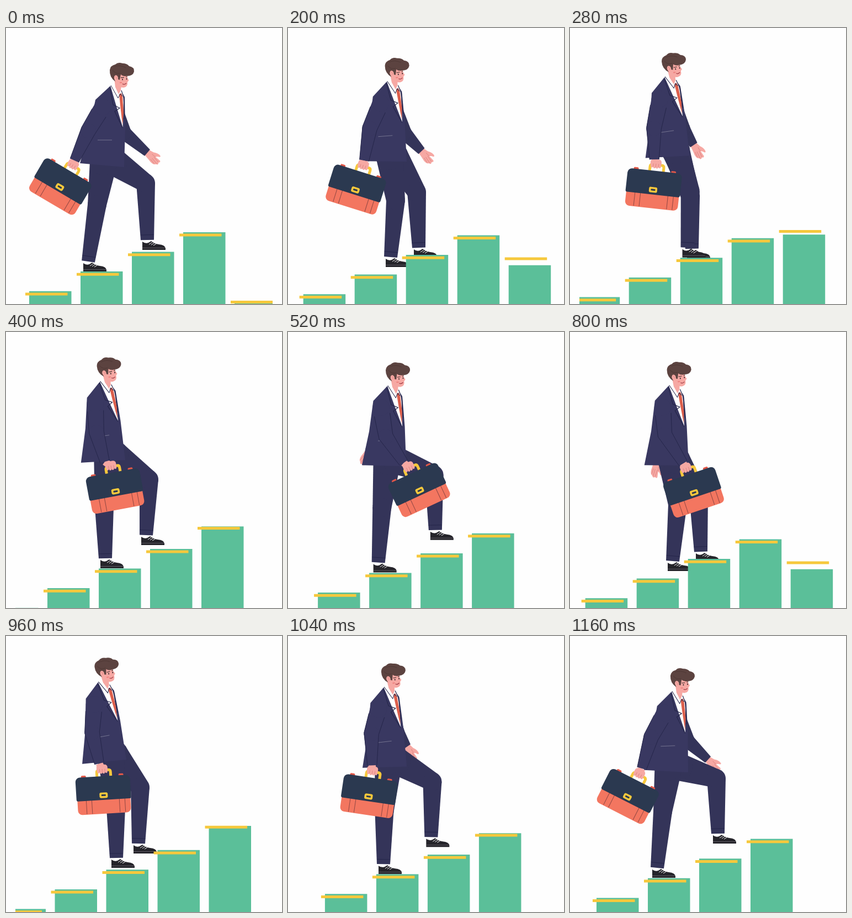
Write an HTML page with a canvas that moves like this. It is 500 px wide and 500 px high and loops after 1200 ms.

```html
<!DOCTYPE html>
<html lang="en">
<head>
<meta charset="utf-8">
<title>Climbing the chart</title>
<style>
  html, body { margin: 0; width: 100%; height: 100%; overflow: hidden; background: #fefefe; }
  canvas { display: block; }
</style>
</head>
<body>
<canvas id="stage" width="500" height="500"></canvas>
<script>
const ctx = document.getElementById('stage').getContext('2d');
const LOOP = 1200, STEP = 600, TICK = 40;
const NAVY = '#393861', TROUSER = '#343459', LINE = '#25264a';
const SKIN = '#f6a8a3', SKIN_LINE = '#d9807e', HAIR = '#5c4340';
const YELLOW = '#f6c83c', GREEN = '#5bbf99', FLAP = '#2b3950', ORANGE = '#f37660';

// Key poses: time in ms, then the values
const SCROLL = [[0, 0], [80, .5], [200, 14.3], [360, 46.5], [400, 60], [560, 87], [600, 93]];
// Rise of a new column: column offset, extra bar offset
const RISE = [[-200, 200, 0], [-40, 175, -4], [0, 164, -7], [80, 160, -8], [200, 90, -17],
  [360, -8, -3], [400, -5, -2], [560, 0, 0]];
// Jacket corner x, y and lean in degrees
const TORSO = [[0, 214, 252, 0], [80, 213, 251.5, 0], [200, 215, 242, -4.4],
  [360, 218, 224, -10.5], [400, 216, 232, -8.4], [560, 214, 247, -2]];
// Knee x, y, heel x, sole y
const LEG = [[0, 253, 281, 247, 402], [80, 255, 282, 248, 402], [200, 233, 297, 228, 416],
  [360, 199, 312, 191, 420], [400, 178, 318, 171, 428], [560, 168, 318, 149, 438],
  [600, 165, 320, 140, 441], [680, 163, 318, 140, 441], [800, 195, 312, 177, 433],
  [960, 243, 274, 231, 394], [1000, 259, 267, 245, 386], [1160, 265, 258, 259, 376]];
// Elbow x, y, wrist x, y, grip x, y, case angle
const NEAR_ARM = [[0, 149, 186, 124, 240, 121, 248, 30.5], [80, 149, 186, 124, 240, 121, 248, 30.5],
  [200, 148, 182, 138, 240, 136, 249, 17.5], [400, 164, 182, 179, 235, 190, 243, -10.5],
  [600, 183, 193, 221, 238, 229, 246, -29.5], [680, 184, 193, 222, 238, 230, 246, -29.5],
  [800, 172, 186, 205, 238, 210, 247, -18.6], [960, 156, 175, 169, 231, 174, 242, -3.5],
  [1160, 147, 183, 130, 240, 125, 250, 27]];
// Elbow x, y, wrist x, y
const FAR_ARM = [[0, 214, 190, 256, 226], [80, 214, 190, 256, 226], [200, 211, 190, 242, 223],
  [400, 190, 170, 190, 195], [600, 158, 178, 132, 226], [680, 158, 178, 132, 226],
  [800, 165, 185, 158, 236], [960, 185, 165, 192, 190], [1160, 213, 190, 250, 224]];

const clamp = (v, lo, hi) => Math.min(hi, Math.max(lo, v));
const mod = (v, n) => ((v % n) + n) % n;

// Monotone cubic through the keys; wraps when a period is given, else holds the ends
function at(keys, time, period) {
  const n = keys.length;
  const key = i => {
    if (!period) return keys[clamp(i, 0, n - 1)];
    const turn = Math.floor(i / n), [t, ...rest] = keys[i - turn * n];
    return [t + turn * period, ...rest];
  };
  const t = period ? mod(time, period) : clamp(time, keys[0][0], keys[n - 1][0]);
  let i = 0;
  while (i < (period ? n - 1 : n - 2) && key(i + 1)[0] <= t) i++;
  const [k0, k1, k2, k3] = [key(i - 1), key(i), key(i + 1), key(i + 2)];
  const h = k2[0] - k1[0], u = (t - k1[0]) / h;
  const rate = (a, b, c) => b[0] === a[0] ? 0 : (b[c] - a[c]) / (b[0] - a[0]);
  const tangent = (p, q) => p * q <= 0 ? 0 : 2 * p * q / (p + q);
  return k1.slice(1).map((v, j) => {
    const c = j + 1, mid = rate(k1, k2, c);
    const m1 = tangent(rate(k0, k1, c), mid) * h, m2 = tangent(mid, rate(k2, k3, c)) * h;
    const d = k2[c] - v;
    return v + u * (m1 + u * (3 * d - 2 * m1 - m2 + u * (m1 + m2 - 2 * d)));
  });
}

function shape(path, fill, stroke, width = 1) {
  const p = new Path2D(path);
  if (fill) { ctx.fillStyle = fill; ctx.fill(p); }
  if (stroke) { ctx.strokeStyle = stroke; ctx.lineWidth = width; ctx.stroke(p); }
}

function box(x, y, w, h, fill, r = 0) {
  ctx.beginPath();
  ctx.roundRect(x, y, w, h, r);
  ctx.fillStyle = fill;
  ctx.fill();
}

function placed(x, y, angle, draw) {
  ctx.save();
  ctx.translate(x, y);
  ctx.rotate(angle);
  draw();
  ctx.restore();
}

const normal = (a, b) => {
  const dx = b[0] - a[0], dy = b[1] - a[1], len = Math.hypot(dx, dy) || 1;
  return [-dy / len, dx / len];
};
const shift = (p, n, r) => [p[0] + n[0] * r, p[1] + n[1] * r];
const mix = (a, b, u) => [a[0] + (b[0] - a[0]) * u, a[1] + (b[1] - a[1]) * u];

function poly(points, fill, stroke) {
  const d = 'M' + points.map(p => p.join(' ')).join('L');
  shape(fill ? d + 'Z' : d, fill, stroke);
}

// Two tapered segments with round upper joints and a flat end
function limb(joints, radii, fill) {
  for (let i = 0; i < 2; i++) {
    const [a, b] = [joints[i], joints[i + 1]], n = normal(a, b);
    poly([shift(a, n, radii[i]), shift(b, n, radii[i + 1]),
      shift(b, n, -radii[i + 1]), shift(a, n, -radii[i])], fill);
    ctx.beginPath();
    ctx.arc(...a, radii[i], 0, 7);
    ctx.fill();
  }
}

function seams([a, b, c], [ra, rb, rc]) {
  const n1 = normal(a, b), n2 = normal(b, c), n = mix(n1, n2, .5);
  for (const side of [1, -1]) {
    const start = mix(shift(a, n1, ra * side), shift(b, n, rb * side), .25);
    poly([start, shift(b, n, rb * side), shift(c, n2, rc * side)], null, LINE);
  }
}

function shoe(x, sole) {
  placed(x, sole, 0, () => {
    shape('M0 0V-15Q5-11 11-13L16-16Q22-11 30-10Q41-9 42-3V0Z', '#25242a');
    shape('M0-3.5H41', null, '#6b6870', .8);
    shape('M12-10L18-14M16-9L22-13M20-8L25-11', null, '#f4f4f4', 1);
  });
}

function leg([kx, ky, x, sole], [px, py]) {
  const hip = [px - 28 + (x - 194) * .17, py - 10], knee = [kx, ky], ankle = [x + 9, sole - 18];
  shoe(x, sole);
  limb([hip, knee, ankle], [25, 17, 12], TROUSER);
  const n = normal(knee, ankle), cuff = mix(ankle, knee, .09);
  poly([shift(cuff, n, 12), shift(cuff, n, -12)], null, LINE);
}

function openHand(elbow, wrist) {
  placed(...wrist, Math.atan2(wrist[1] - elbow[1], wrist[0] - elbow[0]), () => {
    shape('M-1-6L8-8Q16-13 22-11Q24-9 19-7L16-4L27-4Q30-2 27 0L28 2Q29 5 26 5L23 8Q18 10 11 8L-1 6Z', SKIN);
    shape('M14-2L26 0M13 2L26 4M12 5L22 7M8-4Q12-3 16-4', null, SKIN_LINE, .8);
  });
}

function head() {
  shape('M196 90L198 107L204 120L208 113L209 103Z', SKIN);
  shape('M198 82L219 83L220 90L222.500 95L220 98Q221 107 213 108Q203 108 199 99Z', SKIN);
  shape('M198 97Q187 89 188 76Q189 68 198 66Q203 61 211 64Q219 64 223 69Q233 71 232 79Q230 87 219 87Q212 88 208 84L206 94L203 93Q197 82 196 91Z', HAIR);
  shape('M196 70Q207 66 217 72M193 76Q198 84 207 82', null, '#4c3633', .8);
  ctx.beginPath();
  ctx.ellipse(199.5, 90.5, 3.6, 5, -.2, 0, 7);
  ctx.fillStyle = SKIN;
  ctx.fill();
  shape('M198 88Q202 89 200 93', null, SKIN_LINE, .8);
  shape('M208 90L214 89.500M217 89L220 88', null, HAIR, 1.3);
  shape('M211 92V94.500M218.500 91V93.500', null, '#33282c', 1.6);
  shape('M211 101Q214 103.500 218 100', null, '#a33f47', 1.2);
  shape('M206 99H210', null, '#ee827f', 2);
}

function torso() {
  shape('M189 105L162 130L151 185L134 245L214 252L216 180L215 125L208 112Z', NAVY);
  shape('M189 104L196 102L204 117L209 110L212 119L213 135L211.500 180L200 142Z', '#fff');
  shape('M205 120L209 118L211 123L213 154L211 175L207 140Z', '#dc5f4c');
  shape('M190 104L203 127L207 119L211 124', null, LINE, 1);
  shape('M188 107L194 139L206 145L197 151L211 181M209 113L214 128V165', null, LINE, 1.2);
  shape('M166 203H192', null, '#74738f', 1);
  head();
}

function briefcase() {
  shape('M-10 13V5Q-10 1-6 1H11Q15 1 15 5V13', null, YELLOW, 5);
  box(-39, 9, 9, 5, '#e25848', 2);
  box(29, 9, 9, 5, '#e25848', 2);
  box(-48, 42, 96, 38, ORANGE, 8);
  shape('M-32 54V79M-22 54V79M28 54V79M38 54V79', null, '#8f4743', 1);
  box(-49.5, 12, 99, 43, FLAP, [8, 8, 3, 3]);
  box(-7.5, 41.5, 15, 10, YELLOW, 3);
  box(-4, 45, 8, 3, FLAP, 1);
}

function grip() {
  box(-10, -9, 20, 14, SKIN, 5);
  for (let i = 0; i < 4; i++) box(-9 + i * 4.7, -3, 4.4, 11 - Math.abs(i - 1.5), SKIN, 2.2);
  shape('M-4.500-1V5M.2-1V6M5-1V5', null, SKIN_LINE, .8);
}

function man(t) {
  const [px, py, lean] = at(TORSO, t, STEP), a = lean * Math.PI / 180;
  const onTorso = (x, y) => {
    const dx = x - 214, dy = y - 252;
    return [px + dx * Math.cos(a) - dy * Math.sin(a), py + dx * Math.sin(a) + dy * Math.cos(a)];
  };

  const far = at(FAR_ARM, t, LOOP), farElbow = far.slice(0, 2), farWrist = far.slice(2);
  openHand(farElbow, farWrist);
  limb([onTorso(196, 140), farElbow, farWrist], [13, 13, 7.5], TROUSER);

  leg(at(LEG, t, LOOP), [px, py]);
  leg(at(LEG, t + STEP, LOOP), [px, py]);

  placed(px, py, a, () => {
    ctx.translate(-214, -252);
    torso();
  });

  const [ex, ey, wx, wy, gx, gy, tilt] = at(NEAR_ARM, t, LOOP);
  const turn = tilt * Math.PI / 180;
  placed(gx, gy, turn, briefcase);
  shape(`M${wx} ${wy}L${gx} ${gy}`, null, SKIN, 13);
  placed(gx, gy, turn, grip);
  const joints = [onTorso(175, 143), [ex, ey], [wx, wy]], radii = [15, 13.5, 8.5];
  limb(joints, radii, NAVY);
  seams(joints, radii);
}

function columns(t) {
  const phase = t % STEP, [scroll] = at(SCROLL, phase);
  ctx.save();
  ctx.beginPath();
  ctx.rect(17, 0, 466, 500);
  ctx.clip();
  for (let i = -1; i < 6; i++) {
    const [rise, barRise] = at(RISE, phase + (4 - i) * STEP);
    const x = 42 + 93 * i - scroll, y = 476.7 - 35.6 * i + scroll * .383 + rise;
    box(x, y, 76.5, 600, GREEN);
    box(x - 7, y + 2.7 + barRise, 76.5, 5, YELLOW);
  }
  ctx.restore();
}

function draw() {
  const tick = Math.floor(performance.now() % LOOP / TICK) * TICK;
  const t = tick < 80 ? 0 : tick;
  ctx.fillStyle = '#fefefe';
  ctx.fillRect(0, 0, 500, 500);
  man(t);
  columns(t);
  requestAnimationFrame(draw);
}
draw();
</script>
</body>
</html>
```
